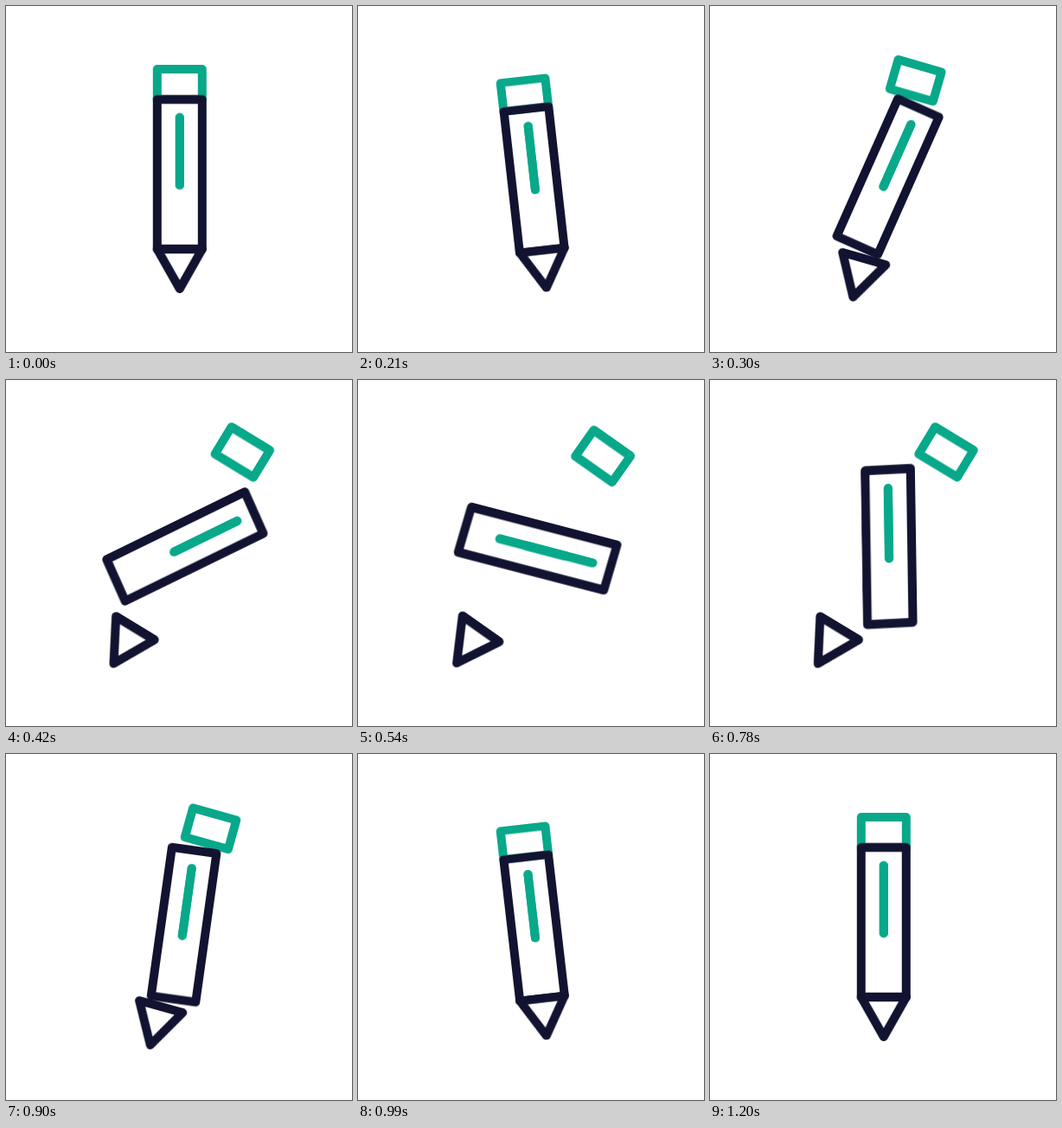
Animation, 400 px wide and 400 px high, one loop 1.32 s. Source, as an HTML page without scripts:

```html
<!DOCTYPE html>
<html lang="en">
<head>
<meta charset="utf-8">
<title>Pencil</title>
<style>
  html, body { margin: 0; width: 100%; height: 100%; overflow: hidden; background: #fff; }
  svg { display: block; width: 100vw; height: 100vh; }

  .ink { fill: none; stroke: #121331; stroke-width: 10; stroke-linecap: round; stroke-linejoin: round; }
  .green { stroke: #08a88a; }

  .ink g, .moving {
    animation: 1320ms cubic-bezier(.333, 0, .667, 1) infinite both;
  }
  .ink .shift { animation-name: shift; }
  .ink .pose { animation-name: pose; }
  .ink .spin { animation-name: spin; }
  .eraser { --gap: -21px; animation-name: part; }
  .tip { --gap: 22px; animation-name: part; }
  .tail { animation-name: tail; }
  .head { animation-name: head; }

  @keyframes shift {
    0%, 90.909%, 100% { transform: translate(200.8px, 200px); }
    15.909%, 75% { transform: translate(204.2px, 206px); }
    31.818%, 59.091% { transform: translate(203.9px, 197.4px); }
    45.455% { transform: translate(204.4px, 200.4px); }
  }

  /* Wind up, swing out with a long settle, then the same in reverse. */
  @keyframes pose {
    0%, 90.909%, 100% { transform: rotate(0deg) scale(1, 1); }
    15.909% { transform: rotate(-6.5deg) scale(1, .95); animation-timing-function: cubic-bezier(.25, 0, 0, 1); }
    45.455% { transform: rotate(35.6deg) scale(1, 1.05); animation-timing-function: cubic-bezier(1, 0, .75, 1); }
    75% { transform: rotate(-6.5deg) scale(1, .95); }
  }
  @keyframes part {
    0%, 75%, 100% { transform: translateY(0); }
    15.909% { transform: translateY(0); animation-timing-function: cubic-bezier(.25, 0, 0, 1); }
    45.455% { transform: translateY(var(--gap)); animation-timing-function: cubic-bezier(1, 0, .75, 1); }
  }

  /* Half a turn; the mark slides to the other end so the loop closes. */
  @keyframes spin {
    0%, 15.15% { transform: translateY(-5.5px) rotate(0deg); }
    75.76%, 100% { transform: translateY(-5.5px) rotate(180deg); }
  }
  @keyframes tail {
    0%, 30.23% { transform: translateY(0); }
    48.86%, 100% { transform: translateY(53px); }
  }
  @keyframes head {
    0%, 42.05% { transform: translateY(0); }
    60.68%, 100% { transform: translateY(53px); }
  }
</style>
</head>
<body>
<svg viewBox="0 0 400 400" class="ink">
  <g class="shift">
    <g class="pose">
      <path class="moving eraser green" d="M-26-127h52v35h-52z"/>
      <path class="moving tip" d="M-26 81h52L0 127z"/>
      <g class="spin">
        <path d="M-26-86.5h52v173h-52z"/>
        <path class="moving tail green" d="M0-65.5v78"/>
        <path class="moving head green" d="M0-65.5v78"/>
      </g>
    </g>
  </g>
</svg>
</body>
</html>
```
